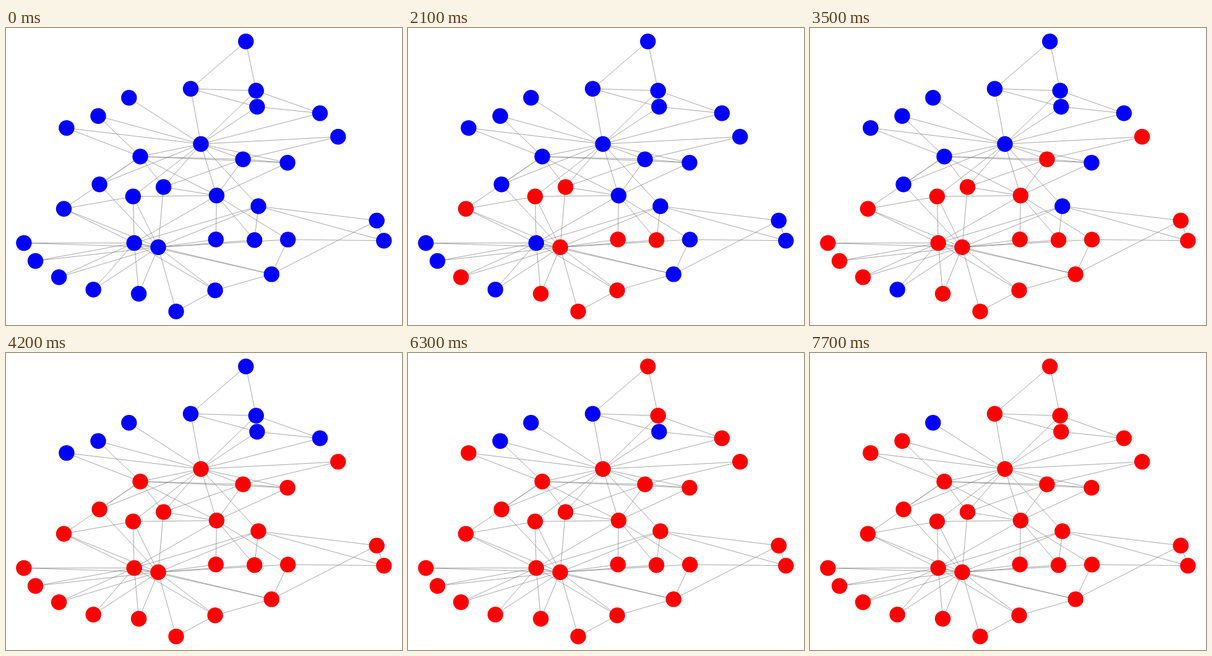
Animation, 640 px wide and 480 px high, one loop 8000 ms. Source, as an HTML page with a canvas:

```html
<!DOCTYPE html>
<html lang="en">
<head>
<meta charset="utf-8">
<title>Spread through a network</title>
<style>
  html, body { margin: 0; width: 100%; height: 100%; overflow: hidden; background: #fff; }
  canvas { display: block; width: 640px; height: 480px; }
</style>
</head>
<body>
<canvas id="stage" width="640" height="480"></canvas>
<script>
const LOOP = 8000, STEP = 700, RADIUS = 12.7;
const ctx = document.getElementById("stage").getContext("2d");
const nodes = [], links = [];

// Each call adds the nodes that turn red one step after the previous call.
let step = 0;
function wave(...points) {
  step++;
  for (const [x, y] of points) nodes.push({ x, y, step });
}

// Links one node to others, given as indices or [first, last] ranges.
function join(hub, ...others) {
  for (const item of others) {
    const [first, last] = [item, item].flat().length > 2 ? item : [item, item];
    for (let i = first; i <= last; i++) links.push([nodes[hub], nodes[i]]);
  }
}

wave([275, 458.1]);
wave([246, 354.3]);
wave([339.2, 341.8], [254.6, 257], [401.6, 342.7], [205.4, 272.3],
     [85.6, 402.7], [214.6, 429.5], [338, 424], [93.5, 292.2]);
wave([383, 212.2], [455.6, 341.9], [340.4, 270.8], [28.9, 347.5],
     [429.2, 397.9], [207.2, 347.4]);
wave([536.7, 175.8], [47.6, 376.5], [610.8, 343.7], [599.2, 311.2]);
wave([315, 187.5], [217, 207.7], [455, 217.8], [151.1, 252.8],
     [141.2, 422.8], [407.9, 288]);
wave([404.2, 101.3], [97.9, 161.6]);
wave([507.4, 137.8]);
wave([387.7, 21.7]);
wave([298.5, 98.2], [405.8, 127.3]);
wave([149, 142.3]);
wave([198.8, 112.8]);

join(1, 0, [2, 9], 11, [13, 15], 17, [23, 25]);
join(15, [5, 9], [12, 14], 17, 24, 25);
join(20, 3, 5, 10, 12, 16, [21, 23], [25, 28], [30, 33]);
join(21, 3, 9, 10, 12, 22, 23, 27, 32);
join(12, [2, 5], 10, 11, 22);
join(10, 3, 16, 22);
join(26, [28, 30]);
join(30, 29, 31);
join(31, 28);
join(9, 5);
join(14, 8, 11, 19);
join(18, 11, 19, 25);
join(25, 4, 19);
join(0, 8);

function draw(time) {
  const now = Math.floor((time % LOOP) / STEP);
  ctx.fillStyle = "#fff";
  ctx.fillRect(0, 0, 640, 480);

  ctx.strokeStyle = "#808080";
  ctx.lineWidth = 0.7;
  for (const [a, b] of links) {
    ctx.beginPath();
    ctx.moveTo(a.x, a.y);
    ctx.lineTo(b.x, b.y);
    ctx.stroke();
  }

  for (const node of nodes) {
    ctx.fillStyle = now >= node.step ? "#ff0000" : "#0000ff";
    ctx.beginPath();
    ctx.arc(node.x, node.y, RADIUS, 0, Math.PI * 2);
    ctx.fill();
  }
}

let begin = null;
function tick(now) {
  if (begin === null) begin = now;
  draw(now - begin);
  requestAnimationFrame(tick);
}
draw(0);
requestAnimationFrame(tick);
</script>
</body>
</html>
```
